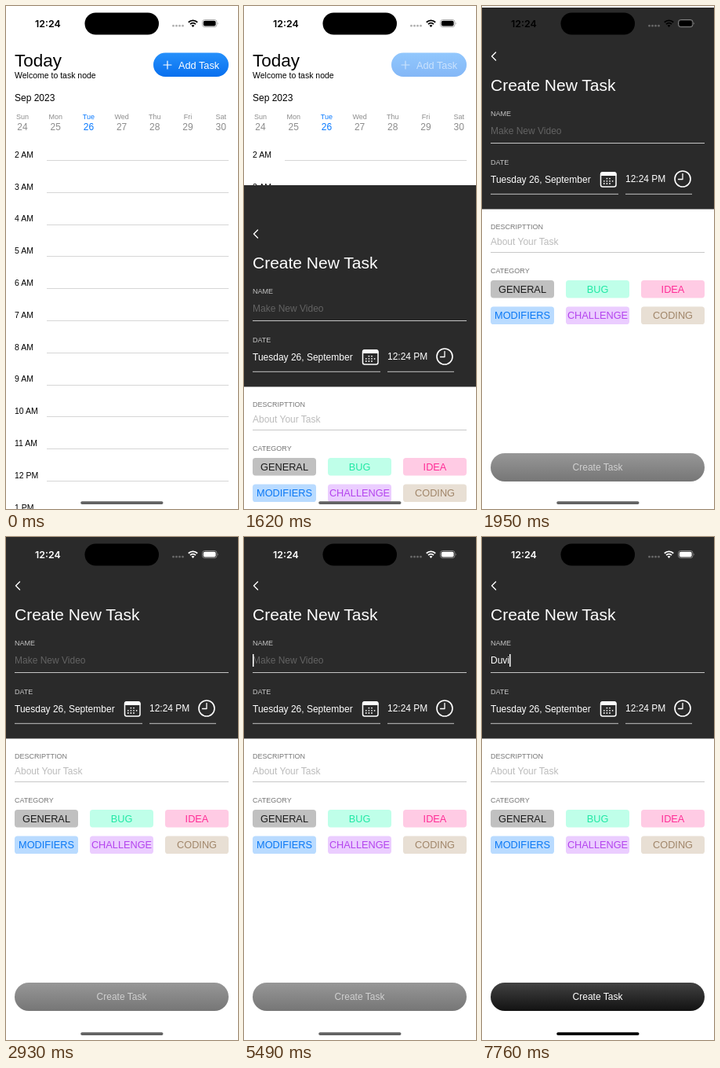
Animation, 296 px wide and 640 px high, one loop 8 s. Source, as an HTML page:

```html
<!DOCTYPE html>
<html lang="en">
<head>
<meta charset="utf-8">
<title>Task planner</title>
<style>
html, body { margin: 0; width: 100%; height: 100%; overflow: hidden; background: #fff; }
svg { display: block; width: 296px; height: 640px; }
text { font-family: "Liberation Sans", Arial, sans-serif; font-size: 12px; white-space: pre; }
.mid { text-anchor: middle; }
.label { font-size: 9px; }
.hour { font-size: 10.5px; }
.chip { font-size: 12.75px; text-anchor: middle; }
.clock { font: 600 12.4px Inter, sans-serif; }
.line { fill: none; stroke-linecap: round; stroke-linejoin: round; }
</style>
</head>
<body>
<svg viewBox="0 0 296 640">
  <defs>
    <linearGradient id="blue" x2="0" y2="1">
      <stop stop-color="#2590fb"/><stop offset="1" stop-color="#086fee"/>
    </linearGradient>
    <linearGradient id="idle" x2="0" y2="1">
      <stop stop-color="#979797"/><stop offset="1" stop-color="#767676"/>
    </linearGradient>
    <linearGradient id="ready" x2="0" y2="1">
      <stop stop-color="#424242"/><stop offset="1" stop-color="#121212"/>
    </linearGradient>
  </defs>

  <rect width="296" height="640" fill="#fff"/>
  <g id="today">
    <text x="11" y="77" style="font-size:22.5px">Today</text>
    <text x="11" y="91.5" class="hour">Welcome to task node</text>
    <text x="11" y="120.5">Sep 2023</text>
    <rect id="addPill" x="188" y="59.5" width="96" height="30.5" rx="15.2" fill="url(#blue)"/>
    <g id="addLabel" fill="#fff">
      <path d="M201 75h10M206 70v10" class="line" stroke="#fff" stroke-width="1.2"/>
      <text x="220" y="79.5" style="font-size:12.75px">Add Task</text>
    </g>
  </g>

  <g id="sheet">
    <rect width="296" height="640" fill="#fff"/>
    <rect width="296" height="256.5" fill="#2a2a2a"/>
    <path d="M17.5 57l-5 5 5 5" class="line" stroke="#fff" stroke-width="1.4"/>
    <g fill="#fff">
      <text x="11" y="106" style="font-size:21px">Create New Task</text>
      <text x="11" y="138" class="label" fill="#c4c4c4">NAME</text>
      <text id="hint" x="11" y="161" fill="#636363">Make New Video</text>
      <text id="name" x="11" y="161"></text>
      <rect id="caret" y="149" width="1.5" height="16"/>
      <text x="11" y="200" class="label" fill="#c4c4c4">DATE</text>
      <text x="11" y="223">Tuesday 26, September</text>
      <text x="183" y="222.3">12:24 PM</text>
    </g>
    <path d="M11 172.5H284M11 237.3H174M183 237.3H268" stroke="#c4c4c4"/>
    <g id="calendar">
      <rect x="151.5" y="210" width="19.5" height="18" rx="2.5" fill="none" stroke="#fff" stroke-width="1.5"/>
      <path d="M151 214V212a3 3 0 0 1 3-3h14.500a3 3 0 0 1 3 3v2z" fill="#fff"/>
    </g>
    <g class="line" stroke="#fff" stroke-width="1.6">
      <circle cx="256" cy="218" r="10"/>
      <path d="M256 211.500V218.500H250.500" stroke-width="1.3"/>
    </g>
    <text x="11" y="282" class="label" fill="#777">DESCRIPTTION</text>
    <text x="11" y="301.700" fill="#bcbcbc">About Your Task</text>
    <path d="M11 311.500H284" stroke="#c8c8c8"/>
    <text x="11" y="337.700" class="label" fill="#777">CATEGORY</text>
    <g id="chips"></g>
    <rect id="create" x="11" y="567" width="273" height="36" rx="18"/>
    <text id="createLabel" x="147.500" y="589.200" class="mid">Create Task</text>
  </g>

  <rect x="100.500" y="8.500" width="94.500" height="28" rx="14"/>
  <g id="status">
    <text x="37" y="26.500" class="clock">12:24</text>
    <g id="signal" fill="#888" opacity=".65"></g>
    <g class="line" stroke="currentColor" stroke-width="1.9" style="stroke-linecap:butt">
      <path d="M232.800 20.700a8.200 8.200 0 0 1 11.400 0M235 23.100a5.200 5.200 0 0 1 7 0"/>
    </g>
    <path d="M238.500 27l-2-2.200a3 3 0 0 1 4 0z"/>
    <rect x="250.500" y="17.500" width="18.500" height="9.200" rx="3" fill="none" stroke="#999" stroke-width=".8"/>
    <rect x="251.800" y="18.700" width="15.800" height="6.800" rx="2"/>
    <path d="M270 20.700q1.400 1.400 0 2.800z" fill="#999"/>
  </g>
  <rect id="home" x="95.200" y="630.200" width="105.300" height="3.700" rx="1.850"/>
</svg>
<script>
const LOOP = 8000;
const $ = id => document.getElementById(id);

function add(parent, tag, attrs, text = '') {
  const el = document.createElementNS('http://www.w3.org/2000/svg', tag);
  for (const key in attrs) el.setAttribute(key, attrs[key]);
  el.textContent = text;
  parent.append(el);
  return el;
}

['Sun', 'Mon', 'Tue', 'Wed', 'Thu', 'Fri', 'Sat'].forEach((day, i) => {
  const x = 21 + 42.2 * i;
  const fill = day === 'Tue' ? '#0a7aff' : '#8c8c8c';
  add($('today'), 'text', { x, y: 143.8, class: 'label mid', fill }, day);
  add($('today'), 'text', { x, y: 157.5, class: 'mid', fill }, 24 + i > 30 ? '' : 24 + i);
});

for (let i = 0; i < 12; i++) {
  const hour = i + 2, y = 192.7 + 40.8 * i;
  const label = `${hour > 12 ? hour - 12 : hour} ${hour < 12 ? 'AM' : 'PM'}`;
  add($('today'), 'text', { x: 11, y, class: 'hour' }, label);
  add($('today'), 'path', { d: `M52 ${Math.round(y + 3.3) + .5}H284`, stroke: '#d6d6d6' });
}

[
  ['GENERAL', '#1c1c1c', '#c0c0c0'], ['BUG', '#20e8a4', '#bfffe9'], ['IDEA', '#ff2d96', '#ffcbe4'],
  ['MODIFIERS', '#0a78f5', '#b9dbff'], ['CHALLENGE', '#b444ee', '#ebcdff'], ['CODING', '#a1866a', '#e8dfd4']
].forEach(([label, color, back], i) => {
  const x = 11 + 96 * (i % 3), y = 347 + 33.6 * Math.floor(i / 3);
  add($('chips'), 'rect', { x, y, width: 81, height: 22.5, rx: 3.7, fill: back });
  add($('chips'), 'text', { x: x + 40.5, y: y + 15.7, class: 'chip', fill: color }, label);
});

for (let i = 0; i < 11; i++) {
  const cell = i + (i > 1 ? 2 : 1);
  if (cell > 10) break;
  add($('calendar'), 'circle', {
    cx: 155.8 + 3.6 * (cell % 4), cy: 217.6 + 3.2 * Math.floor(cell / 4), r: .9, fill: '#fff'
  });
}

for (let i = 0; i < 4; i++) add($('signal'), 'circle', { cx: 213.5 + 4 * i, cy: 25.2, r: 1.4 });

// Each track lists [start time, value]; values hold until the next entry.
const tracks = {
  pressed: [[0, false], [1300, true]],
  sheetY: [[0, 640], [1620, 228], [1730, 58], [1840, 13], [1950, 2], [2060, .5], [2190, 0]],
  status: [[0, '#000'], [2060, '#888'], [2190, '#fff']],
  caret: [[0, 0], [3060, 1], [3560, .8], [3700, .5], [3810, .2], [3930, 0], [4090, .3], [4190, .7],
    [4420, 1], [4750, .5], [4870, 0], [5010, .2], [5110, .5], [5220, .8], [5490, 1],
    [5770, .6], [5880, .2], [5990, 0], [6110, .2], [6220, .6], [6330, 1]],
  name: [[0, ''], [6550, 'D'], [6760, 'Du'], [7010, 'Duv'], [7260, 'Duvi']],
  home: [[0, '#626262'], [7760, '#000']]
};
const at = (track, t) => tracks[track].findLast(([start]) => start <= t)[1];

function render(t) {
  const pressed = at('pressed', t), name = at('name', t), status = at('status', t);
  $('addPill').setAttribute('opacity', pressed ? .5 : 1);
  $('addLabel').setAttribute('opacity', pressed ? .55 : 1);
  $('sheet').setAttribute('transform', `translate(0 ${at('sheetY', t)})`);
  $('status').style.color = $('status').style.fill = status;

  if ($('name').textContent !== name) $('name').textContent = name;
  $('hint').setAttribute('visibility', name ? 'hidden' : 'visible');
  $('caret').setAttribute('x', 11 + (name ? $('name').getComputedTextLength() : 0));
  $('caret').setAttribute('opacity', at('caret', t));

  $('create').setAttribute('fill', name ? 'url(#ready)' : 'url(#idle)');
  $('createLabel').setAttribute('fill', name ? '#fff' : '#d0d0d0');
  $('home').setAttribute('fill', at('home', t));
}

const begin = performance.now();
function tick() {
  render((performance.now() - begin) % LOOP);
  requestAnimationFrame(tick);
}
tick();
</script>
</body>
</html>
```
